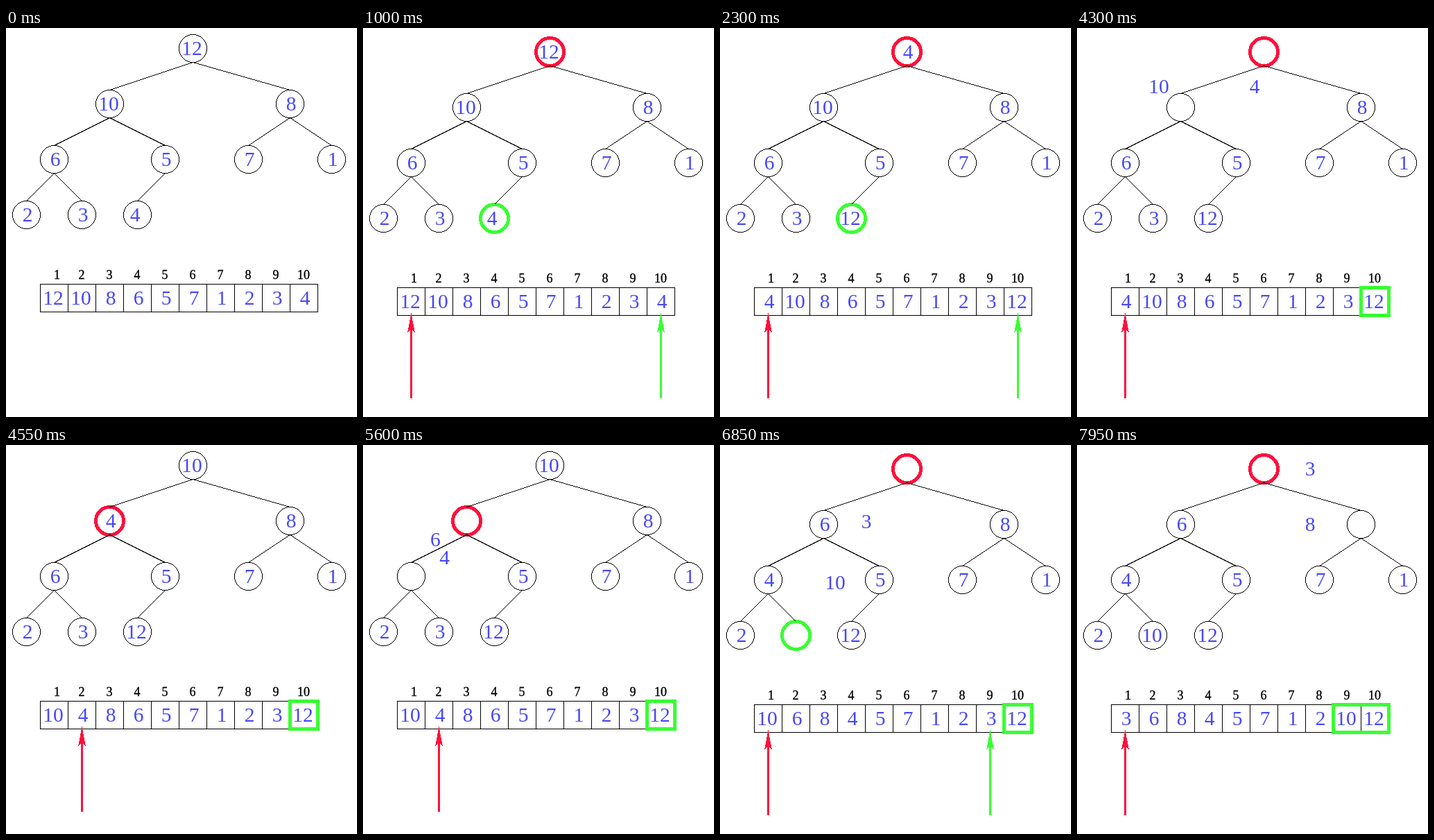
An HTML page for the animation above (8000 ms loop, 506 by 561 pixels).

```html
<!DOCTYPE html>
<html lang="en">
<head>
<meta charset="utf-8">
<title>Heap sort</title>
<style>
html, body { margin: 0; width: 100%; height: 100%; overflow: hidden; background: #fff; }
svg { display: block; width: 506px; height: 561px; shape-rendering: crispEdges; }
text { font-family: "Liberation Serif", "Times New Roman", serif; text-anchor: middle; }
.value { font-size: 29.5px; fill: #4848f8; }
.index { font-size: 18px; stroke: #000; stroke-width: 0.35; }
.thin { fill: none; stroke: #000; }
.thick { fill: none; stroke-width: 5; }
</style>
</head>
<body>
<svg viewBox="0 0 506 561"><g id="stage"></g></svg>
<script>
const LOOP = 8000, STEP = 50;
const RED = '#ff0f3c', GREEN = '#38ff32';
const stage = document.getElementById('stage');

// Heap order: each level sits 80 lower
const nodes = [269, 149, 409, 69, 229, 349, 469, 29, 109, 189]
  .map((x, i) => [x + 0.5, 29.5 + 80 * Math.floor(Math.log2(i + 1))]);
const cellX = i => 69.5 + 40 * i;
const start = [12, 10, 8, 6, 5, 7, 1, 2, 3, 4];

// Two values trade places, each stepping aside to its via point first
const swaps = [
  { pair: [0, 9], via: [[289, 74], [169, 224]] },
  { pair: [0, 1], via: [[254, 79], [119, 79]] },
  { pair: [1, 3], via: [[139, 149], [79, 149]] },
  { pair: [0, 8], via: [[254, 79], [119, 219]] },
  { pair: [0, 2], via: [[334, 29], [334, 109]] }
];

// swapped: finished swaps, done: first sorted cell
const scenes = [
  { at: 0, swapped: 0 },
  { at: 1000, swapped: 0, red: 0, green: 9 },
  { at: 2000, swapped: 0, red: 0, green: 9, moving: true },
  { at: 2300, swapped: 1, red: 0, green: 9 },
  { at: 3300, swapped: 1, red: 0, done: 9 },
  { at: 4300, swapped: 1, red: 0, done: 9, moving: true },
  { at: 4550, swapped: 2, red: 1, done: 9 },
  { at: 5550, swapped: 2, red: 1, done: 9, moving: true },
  { at: 5700, swapped: 3, red: 0, green: 8, done: 9 },
  { at: 6700, swapped: 3, red: 0, green: 8, done: 9, moving: true },
  { at: 6950, swapped: 4, red: 0, done: 8 },
  { at: 7950, swapped: 4, red: 0, done: 8, moving: true }
];
scenes.forEach((s, i) => {
  const next = scenes[i + 1];
  s.steps = ((next ? next.at : LOOP) - s.at) / STEP;
  s.vals = [...start];
  for (const { pair: [a, b] } of swaps.slice(0, s.swapped)) {
    [s.vals[a], s.vals[b]] = [s.vals[b], s.vals[a]];
  }
});

const text = (cls, x, y, s) => `<text class="${cls}" x="${x}" y="${y}">${s}</text>`;
const value = (x, y, n) => text('value', x + (n > 9 ? -1.5 : 1.5), y + 9.5, n);
const box = (x, width, look) =>
  `<rect ${look} x="${x - 20}" y="369.5" width="${width}" height="40"/>`;
const line = color => color ? `class="thick" stroke="${color}"` : 'class="thin"';

const circle = ([x, y], color) =>
  `<circle cx="${x}" cy="${y}" r="20" ${line(color)}/>`;

const edge = ([x, y], i) => {
  if (!i) return '';
  const [px, py] = nodes[(i - 1) >> 1];
  return `<path class="thin" d="M${px} ${py + 20}L${x} ${y - 20}"/>`;
};

const arrow = (i, color) => {
  const x = cellX(i);
  return `<path d="M${x} 425V529" stroke="${color}" stroke-width="3"/>` +
    `<path d="M${x} 406l5.5 29l-5.5 -6l-5.5 6z" fill="${color}"/>`;
};

function place({ swapped, moving, steps }, i, step) {
  if (moving) {
    const { pair, via } = swaps[swapped];
    const side = pair.indexOf(i);
    if (side >= 0) {
      const goal = nodes[pair[1 - side]];
      return via[side].map((v, k) => v + 0.5 + (goal[k] - v - 0.5) * step / steps);
    }
  }
  const [x, y] = nodes[i];
  // The last leaf starts out left of centre
  return [!swapped && i === 9 ? x - 5 : x, y];
}

function draw(scene, step) {
  const { vals, red, green, done } = scene;
  const color = i => i === red ? RED : i === green ? GREEN : '';
  let out = nodes.map((p, i) => circle(p, color(i))).join('') + nodes.map(edge).join('');
  vals.forEach((n, i) => {
    const x = cellX(i);
    out += value(...place(scene, i, step), n);
    out += box(x, 40, line()) + value(x, 389.5, n);
    out += text('index', i ? x - 0.5 : 73.5, 362, i + 1);
  });
  if (done) out += box(cellX(done), 40 * (10 - done), line(GREEN));
  if (red !== undefined) out += arrow(red, RED);
  if (green !== undefined) out += arrow(green, GREEN);
  // A ringed root is taller and pushes the page down
  stage.setAttribute('transform', `translate(0 ${red === 0 ? 5 : 0})`);
  stage.innerHTML = out;
}

const begin = performance.now();
let shown = '';
function tick() {
  const t = (performance.now() - begin) % LOOP;
  const scene = scenes.findLast(s => t >= s.at);
  const step = scene.moving ? Math.floor((t - scene.at) / STEP) : 0;
  const key = scene.at + ':' + step;
  if (key !== shown) {
    shown = key;
    draw(scene, step);
  }
  requestAnimationFrame(tick);
}
tick();
</script>
</body>
</html>
```
